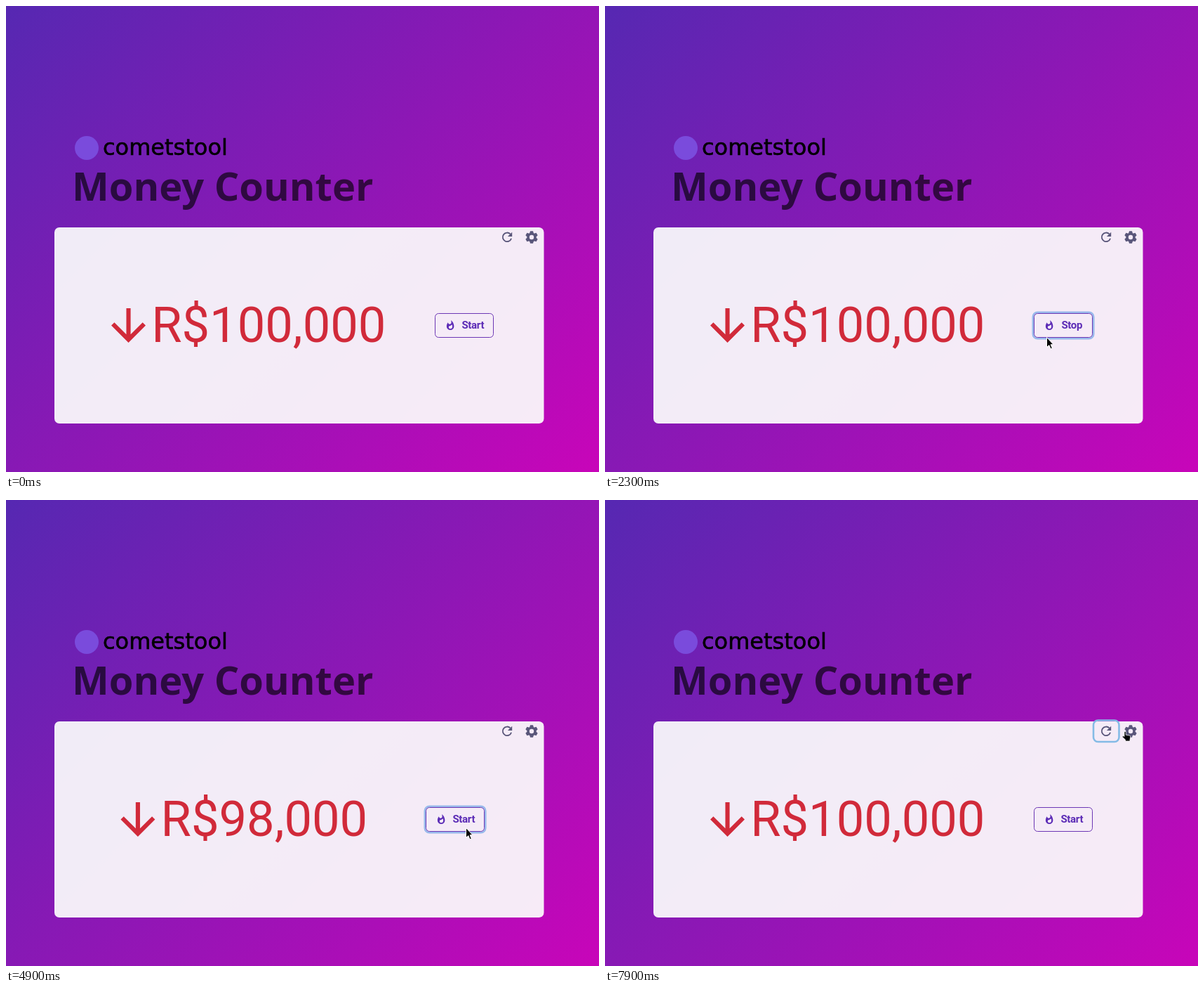
An HTML page for the animation above (8000 ms loop, 845 by 663 pixels).

```html
<!DOCTYPE html>
<html lang="en">
<head>
<meta charset="utf-8">
<title>Money Counter</title>
<style>
  html, body { margin: 0; width: 100%; height: 100%; overflow: hidden; }
  body { background: linear-gradient(135deg, #5628b2, #8e17b5 50%, #c805b9); }
  svg { display: block; width: 100%; height: 100%; }
  .brand { font: 32px "DejaVu Sans", sans-serif; stroke: #000; stroke-width: .6; }
  .title { font: 600 56px "Noto Sans", sans-serif; fill: rgba(0, 0, 0, .64); }
  .money { font: 70.4px Roboto, sans-serif; }
  .red { fill: #d12a3a; }
  .label { font: bold 15px Roboto, sans-serif; letter-spacing: -.3px; text-anchor: middle; }
  .accent { fill: #5c2cb6; }
  .ring { fill: none; stroke-width: 2.6; }
  .tool { fill: #59567a; }
  .hover { fill: #f7f8fc; }
</style>
</head>
<body>
<svg viewBox="0 0 845 663">
  <circle cx="115" cy="202" r="17" fill="#7a4bdc"/>
  <text class="brand" x="138" y="212">cometstool</text>
  <text class="title" x="94" y="277">Money Counter</text>
  <rect x="69" y="315" width="697.5" height="279" rx="7" fill="rgba(252,254,253,.92)"/>

  <rect id="gearHover" class="hover" x="732" y="315" width="34" height="28" rx="5"/>
  <rect id="resetRing" class="ring" stroke="#84bbe6" x="696" y="313.5" width="36.5" height="30.5" rx="6.5"/>
  <g class="tool" transform="translate(714 329)">
    <path d="M4.6-4.6A6.3 6.3 0 1 0 6.1 1.8" fill="none" stroke="#59567a" stroke-width="1.8"/>
    <path d="M7.2-7.2V-.9H.9z"/>
  </g>
  <g class="tool" transform="translate(749 329)">
    <circle r="4.9" fill="none" stroke="#59567a" stroke-width="3.4"/>
    <path id="tooth" d="M-2.9-5.5L-2-8.8H2L2.9-5.5z"/>
    <use href="#tooth" transform="rotate(60)"/>
    <use href="#tooth" transform="rotate(120)"/>
    <use href="#tooth" transform="rotate(180)"/>
    <use href="#tooth" transform="rotate(240)"/>
    <use href="#tooth" transform="rotate(300)"/>
  </g>

  <g id="amount" class="red">
    <path transform="translate(137.8 417.8) scale(3.06)"
      d="M20 12l-1.41-1.41L13 16.17V4h-2v12.17l-5.58-5.59L4 12l8 8z"/>
    <text id="money" class="money" x="207.2" y="478"></text>
  </g>

  <g id="button">
    <rect id="buttonRing" class="ring" stroke="#98b9eb" x="609.8" y="435.8" width="86.4" height="37.4" rx="6.5"/>
    <rect id="buttonHover" class="hover" x="611.5" y="437.5" width="83" height="34" rx="5"/>
    <rect x="611.5" y="437.5" width="83" height="34" rx="5" fill="none" stroke="#6c37b4"/>
    <path class="accent" transform="translate(625.2 446.6) scale(.66)" fill-rule="evenodd"
      d="M13.5.7s.7 2.6.7 4.8c0 2-1.3 3.7-3.4 3.7S7.2 7.500 7.200 5.500C5.200 7.500 4 10.600 4 14a8 8 0 0 0 16 0C20 8.600 17.400 3.800 13.500.7zM11.700 19c-1.800 0-3.200-1.400-3.200-3.100 0-1.600 1-2.800 2.800-3.100 1.800-.4 3.600-1.200 4.600-2.600.4 1.300.6 2.600.6 4a4.800 4.800 0 0 1-4.800 4.800z"/>
    <text id="label" class="label accent" x="665.3" y="459"></text>
  </g>

  <g id="cursor" stroke="#fff" stroke-linejoin="round">
    <path id="arrow" stroke-width="1" d="M.5.5V14.500L3.800 11.600 6 16.800 8.300 15.800 6.100 10.700H10z"/>
    <path id="hand" stroke-width=".7" transform="translate(-4)"
      d="M3 1.500C3 0 5.200 0 5.200 1.500V5.200L10.300 6Q12 6.400 11.800 8L11 12V14H4.500V12L.6 8.400C-.1 7 1.300 6.200 2.200 7L3 7.600z"/>
  </g>
</svg>
<script>
  const LOOP = 8000, STEP = 100;
  const el = id => document.getElementById(id);
  const show = (id, on) => el(id).setAttribute("opacity", Number(on));
  const move = (id, x, y) => el(id).setAttribute("transform", `translate(${x} ${y})`);
  const within = (t, from, to) => t >= from && t < to;

  // Pointer waypoints: time, x, y
  const path = [
    [500, 162, 397], [600, 205, 400], [700, 205, 400], [1200, 584, 448], [1300, 584, 448],
    [1500, 725, 346], [1600, 746, 330], [1700, 690, 395], [1800, 638, 453], [2000, 638, 453],
    [2200, 686, 488], [2300, 629, 471], [2400, 643, 510], [3900, 643, 510], [4500, 654, 453],
    [4700, 654, 453], [4900, 655, 466], [5100, 661, 487], [5300, 661, 487], [5400, 664, 491],
    [5900, 664, 491], [6200, 680, 442], [6500, 729, 355], [6800, 752, 334], [6900, 752, 334],
    [7200, 713, 331], [7600, 713, 331], [7900, 741, 329]
  ];

  function pointer(t) {
    const i = path.findIndex(p => p[0] > t);
    if (i < 1) return path[i < 0 ? path.length - 1 : 0].slice(1);
    const [a, b] = [path[i - 1], path[i]];
    const k = (t - a[0]) / (b[0] - a[0]);
    return [a[1] + (b[1] - a[1]) * k, a[2] + (b[2] - a[2]) * k];
  }

  function draw(now) {
    const t = Math.floor(now % LOOP / STEP) * STEP;
    const value = within(t, 2900, 3900) ? 99 : within(t, 3900, 7300) ? 98 : 100;
    const shift = value < 100 ? -13 : 0;
    const running = within(t, 2000, 4800);
    const overButton = within(t, 1800, 2100) || within(t, 4300, 4900) || within(t, 6100, 6300);

    el("money").textContent = `R$${value},000`;
    el("label").textContent = running ? "Stop" : "Start";
    move("amount", -shift * 1.03, 0);
    move("button", shift, 0);

    show("buttonRing", within(t, 2000, 7300));
    show("buttonHover", overButton);
    show("resetRing", t >= 7300);
    show("gearHover", within(t, 1600, 1800) ? 1 : t === 1800 ? .35 : 0);

    const hand = overButton || t === 1600 || t >= 7200;
    move("cursor", ...pointer(t));
    show("cursor", t >= 500);
    show("hand", hand);
    show("arrow", !hand);
  }

  function tick() {
    draw(performance.now());
    requestAnimationFrame(tick);
  }
  tick();
</script>
</body>
</html>
```
